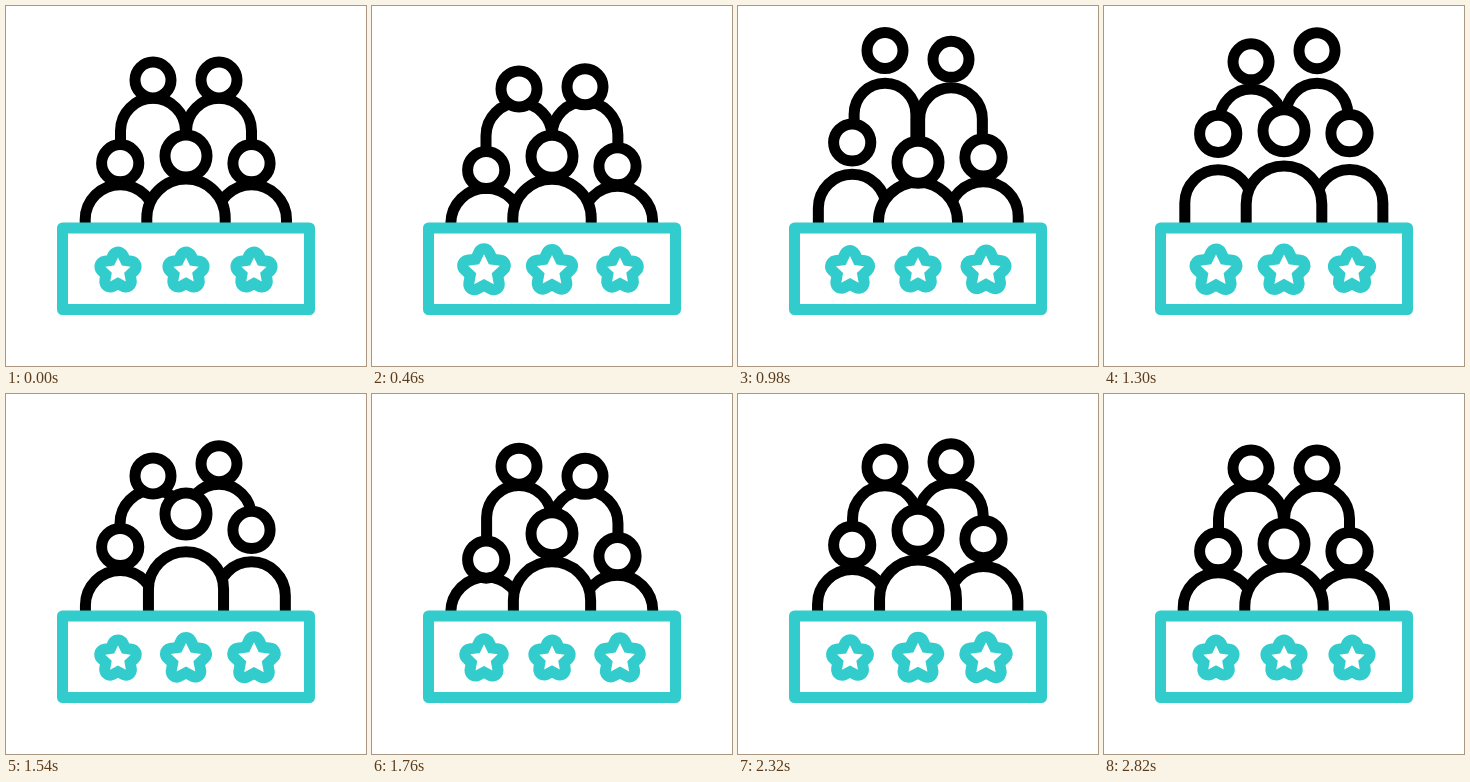
An HTML page for the animation above (3.6 s loop, 360x360 px).

```html
<!DOCTYPE html>
<html lang="en">
<head>
<meta charset="utf-8">
<title>Jury panel</title>
<style>
  html, body { margin: 0; width: 100%; height: 100%; overflow: hidden; background: #fff; }
  svg { display: block; width: 100vw; height: 100vh; }
  .person { stroke: #000; stroke-width: 11; fill: #fff; }
  .back path { fill: none; }
  .desk { fill: #fff; stroke: #33cccc; stroke-width: 11; stroke-linejoin: round; }
  .star { fill: #fff; stroke: #33cccc; stroke-width: 22; stroke-linejoin: round; paint-order: stroke; }
</style>
</head>
<body>
<svg id="stage" viewBox="0 0 360 360">
  <g id="people"></g>
  <rect class="desk" x="56.5" y="222" width="247" height="81.5"/>
  <g id="stars"></g>
</svg>
<script>
const LOOP = 3600;
const PULSE = 800;
const ACTIVE = 2400;

// Vertical offset of a head: [time, offset]
const HOP = [[0, 0], [490, 9], [1020, -30], [1130, -30], [1590, 9], [1945, -14], [ACTIVE, 0]];

// Painted back to front
const PEOPLE = [
  { x: 147, head: 74, r: 18, top: 92.3, half: 32.5, end: 145, delay: 0, back: true },
  { x: 213, head: 74, r: 18, top: 92.3, half: 32.5, end: 145, delay: 133, back: true },
  { x: 114.2, head: 157.2, r: 18.6, top: 178.7, half: 35, end: 219, delay: 133 },
  { x: 245.5, head: 157.2, r: 18.6, top: 178.7, half: 35, end: 219, delay: 267 },
  { x: 180, head: 150, r: 21, top: 173, half: 39.2, end: 219, delay: 400 }
];

const STARS = [
  { x: 112, delay: 0 },
  { x: 180, delay: 200 },
  { x: 248, delay: 400 }
];

function add(parent, tag, attrs = {}) {
  const node = document.createElementNS('http://www.w3.org/2000/svg', tag);
  for (const key in attrs) node.setAttribute(key, attrs[key]);
  return parent.appendChild(node);
}

function starPoints(outer, inner) {
  return Array.from({ length: 10 }, (_, i) => {
    const r = i % 2 ? inner : outer;
    const a = i * Math.PI / 5;
    return (r * Math.sin(a)).toFixed(2) + ',' + (-r * Math.cos(a)).toFixed(2);
  }).join(' ');
}

const ease = u => (1 - Math.cos(Math.PI * u)) / 2;

function hop(t) {
  if (t <= 0 || t >= ACTIVE) return 0;
  const i = HOP.findIndex(step => step[0] > t);
  const [t0, a] = HOP[i - 1];
  const [t1, b] = HOP[i];
  return a + (b - a) * ease((t - t0) / (t1 - t0));
}

function swell(t) {
  if (t <= 0 || t >= ACTIVE) return 1;
  return 1 + 0.275 * ease(2 * t / PULSE);
}

// The body follows the head by half and narrows as it stretches
function bodyPath(p, dy) {
  const half = p.half + dy * 0.055;
  const top = p.top + dy * 0.51;
  const shoulder = Math.min(top + half, p.end);
  return `M${p.x - half} ${p.end}V${shoulder}A${half} ${shoulder - top} 0 0 1 ${p.x + half} ${shoulder}V${p.end}`;
}

const peopleLayer = document.getElementById('people');
for (const p of PEOPLE) {
  const g = add(peopleLayer, 'g', { class: p.back ? 'person back' : 'person' });
  p.bodyNode = add(g, 'path');
  p.headNode = add(g, 'circle', { cx: p.x, r: p.r });
}

const starLayer = document.getElementById('stars');
for (const s of STARS) {
  s.node = add(starLayer, 'polygon', { class: 'star', transform: `translate(${s.x} 264.8)` });
}

function draw(t) {
  for (const p of PEOPLE) {
    const dy = hop(t - p.delay);
    p.headNode.setAttribute('cy', p.head + dy);
    p.bodyNode.setAttribute('d', bodyPath(p, dy));
  }
  // Only the outline grows; its stroke keeps its weight
  for (const s of STARS) {
    const k = swell(t - s.delay);
    s.node.setAttribute('points', starPoints(13.2 * k, 6.5 * k));
  }
}

const start = performance.now();
function tick() {
  draw((performance.now() - start) % LOOP);
  requestAnimationFrame(tick);
}
draw(0);
requestAnimationFrame(tick);
</script>
</body>
</html>
```
